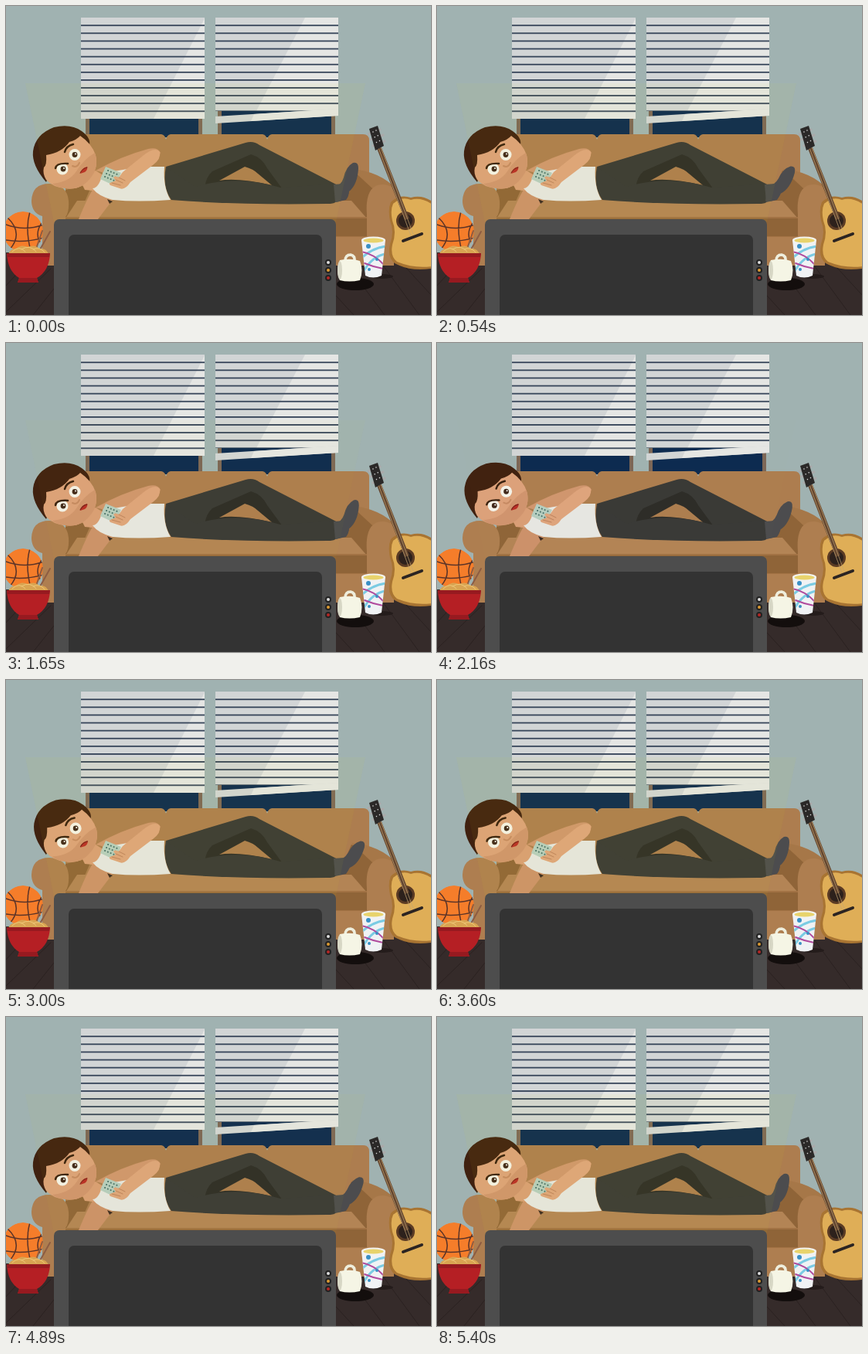
An HTML page for the animation above (5430 ms loop, 550x400 px).

```html
<!DOCTYPE html>
<html lang="en">
<head>
<meta charset="utf-8">
<title>Lazy evening on the sofa</title>
<style>
html, body { margin: 0; width: 100%; height: 100%; overflow: hidden; background: #a0b2b1 }
svg { display: block; width: 550px; height: 400px }
</style>
</head>
<body>
<svg viewBox="0 0 550 400" fill="none" stroke-linecap="round">
  <defs>
    <pattern id="gaps" width="200" height="10.1" y="24.3" patternUnits="userSpaceOnUse">
      <rect width="200" height="1.7" fill="#2b3a50"/>
    </pattern>
    <clipPath id="ball"><circle cx="22" cy="292" r="26"/></clipPath>
    <clipPath id="cup"><path d="M460 303L465 349Q475 354 486 349L491 303Z"/></clipPath>
  </defs>
  <rect width="550" height="400" fill="#a0b2b1"/>

  <!-- windows and blinds -->
  <g fill="#7c6656">
    <path d="M103 20H254V170H103ZM274 20H426V170H274Z"/>
    <path fill="#0c2a50" d="M108 20H249V170H108ZM279 20H421V170H279Z"/>
  </g>
  <path fill="#d2d5d6" d="M97 15H257V146H97ZM271 15H430V136H271Z"/>
  <path fill="#e5e6e4" d="M257 16V146H191ZM387 15H430V136H324Z"/>
  <path fill="url(#gaps)" d="M97 24H257V138H97ZM271 24H430V136H271Z"/>
  <path fill="#d2d5d6" d="M271 143L430 133V142L271 152Z"/>
  <path fill="#e5e6e4" d="M321 140L430 133V142L317 149Z"/>

  <!-- floor -->
  <path fill="#352b2a" d="M0 319H550V400H0Z"/>
  <path stroke="#2a2120" d="M0 362L24 336M0 396L58 340M35 400L62 366M427 375L450 400M445 340L490 400M488 336L535 400M505 325L550 374"/>

  <!-- sofa -->
  <path fill="#ad7d4f" d="M77 270V174Q77 166 85 166H201Q206 167 207 173Q208 167 213 166H332Q337 167 338 173Q339 167 344 166H462Q470 166 470 174V270Z"/>
  <path fill="#8f6438" d="M77 238L112 230L98 262L77 275ZM447 213L492 230L468 275L430 252Z"/>
  <path fill="#a67748" d="M447 211Q485 214 506 238L474 236Z"/>
  <path fill="#b38455" d="M77 275L92 252H447L467 275Z"/>
  <path fill="#a27244" d="M77 273H467V336H77Z"/>
  <path fill="#8f6438" d="M77 275H467V298H77Z"/>
  <path fill="#ae7e50" d="M77 273V299H467V336H47V272Q33 268 33 252Q34 230 56 230Q79 231 81 252Q82 267 77 273ZM467 336V270Q464 232 487 231Q511 233 511 256Q510 268 502 273V336Z"/>

  <!-- legs -->
  <path fill="#393936" d="M207 208L310 177Q320 174 328 180L437 236L425 254L355 235L309 208L270 240L214 250Z"/>
  <path fill="#2d2c28" d="M257 235Q259 221 267 214L317 192Q331 196 338 210L357 236Z"/>
  <path fill="#ad7d4f" d="M276 226L309 208Q320 211 326 217L344 232Q300 222 276 226Z"/>
  <path fill="#393937" d="M207 208Q202 235 214 251Q300 258 416 256Q427 256 428 252L425 230L355 235Q300 218 245 234Z"/>
  <path fill="#4c4c4e" d="M424 231L438 230Q448 241 440 251L426 254Z"/>
  <path id="foot" fill="#4c4c4e" d="M425 234Q434 232 437 222Q440 208 449 203Q456 201 456 210Q455 231 444 240Q443 251 427 254Z"/>

  <!-- torso and arms -->
  <path fill="#cc916a" d="M112 238Q105 249 94 276H119L138 251L126 236Z"/>
  <path fill="#d99e76" d="M94 222L116 213L130 222L122 240L102 238Z"/>
  <path fill="#e6e6e2" d="M112 236Q121 236 126 213L140 208L205 208Q203 235 213 251Q170 254 138 251Q119 246 112 236Z"/>
  <path fill="#3b2a22" d="M131 250L138 253L134 256Z"/>
  <path fill="#d0966e" d="M116 213Q150 194 184 185Q196 182 200 190Q197 200 180 207L128 216Z"/>
  <path fill="#b5cdc0" d="M129 208L149 216L141 233L122 224Z"/>
  <path stroke="#477069" stroke-width="2" stroke-dasharray=".1 4" d="M132 213L144 218M130 217L142 222M128 221L140 226"/>
  <path fill="#dea47c" d="M199 189Q201 198 190 206L161 228Q154 239 147 236L135 232Q132 229 137 228L142 226L139 222Q141 219 146 222L151 215L177 194Q193 181 199 189Z"/>
  <path stroke="#bd825d" d="M137 229L148 232M142 225L151 229M146 222L154 226"/>

  <!-- head -->
  <g id="head">
    <path fill="#402110" d="M52 228Q33 206 35 188Q38 166 62 157Q84 152 98 162Q113 173 106 184L62 205Z"/>
    <path fill="#dca17a" d="M52 225Q47 217 49 209Q53 206 52 193Q72 190 82 176Q92 173 96 168Q111 178 116 193Q120 209 109 223Q97 239 77 236Q61 235 52 225Z"/>
    <path fill="#d0946e" d="M115 190Q121 209 109 223Q97 239 77 236Q66 235 60 230Q82 228 91 214Q101 198 115 190Z"/>
    <path stroke="#c58962" stroke-width="2" d="M86 207Q92 210 95 203"/>
    <g id="eyes">
      <g fill="#f4f2e9"><circle cx="89" cy="192.500" r="7.500"/><circle cx="73" cy="211" r="7.500"/></g>
      <g fill="#40281b"><circle cx="89" cy="192.500" r="3.400"/><circle cx="74" cy="211" r="3.400"/></g>
      <g fill="#fff"><circle cx="90" cy="191.500" r="1"/><circle cx="75" cy="210" r="1"/></g>
    </g>
    <g id="lids" fill="#bb875f"><circle cx="89" cy="192.500" r="7.500"/><circle cx="73" cy="211" r="7.500"/></g>
    <path stroke="#38200f" stroke-width="2.500" d="M64 210Q65 203 80 204M76 189Q78 181 87 179"/>
    <path fill="#b92d27" d="M96 217Q97 210 105 208Q106 212 102 215Z"/>
    <path stroke="#702019" d="M96 216Q99 210 105 209"/>
  </g>

  <!-- glow from the television -->
  <path id="glow" fill="#d0ca18" d="M25 100H465L427 280H62Z"/>

  <!-- ball and bowl -->
  <g clip-path="url(#ball)">
    <circle cx="22" cy="292" r="26" fill="#f57d2a"/>
    <path stroke="#5c3428" stroke-width="1.500" d="M0 283Q24 292 49 283M31 266Q24 290 33 320M2 274Q23 294 5 315M48 278Q34 297 48 310M0 303Q24 307 49 300"/>
  </g>
  <path stroke="#8d5d43" stroke-width="2" d="M38 317L47 291M43 317L57 292"/>
  <path fill="#d9a452" d="M3 322Q5 314 13 314Q20 308 28 312Q37 308 43 314Q53 313 55 322Z"/>
  <path stroke="#efc878" d="M8 318Q17 309 25 318M20 315Q31 308 39 318M35 315Q44 311 50 319"/>
  <path fill="#b51f24" d="M1 320H57Q56 343 40 352L42 358H15L17 352Q2 343 1 320Z"/>
  <path fill="#971a20" d="M1 320H57L56 325H2ZM17 352H40L42 358H15Z"/>

  <!-- guitar -->
  <path fill="#a87432" d="M498 254Q509 243 524 248Q537 244 550 252V340Q523 344 503 333Q493 325 497 308Q503 292 497 278Q494 263 498 254Z"/>
  <path fill="#dfae57" d="M501 256Q511 246 524 251Q537 247 552 257V337Q526 340 506 331Q497 324 500 309Q506 292 500 278Q497 264 501 256Z"/>
  <circle cx="517" cy="278" r="12" fill="#5b3b24"/>
  <circle cx="517" cy="278" r="9" fill="#2d211c"/>
  <path stroke="#63452f" stroke-width="6" stroke-linecap="butt" d="M483 184L519 276"/>
  <path stroke="#c5a773" stroke-width=".7" d="M481 181L525 300M484 180L528 298"/>
  <path stroke="#2b2422" stroke-width="4" d="M514 304L538 295"/>
  <path stroke="#aaa" stroke-width="3" d="M469 166L484 160M472 173L488 167M475 181L490 175"/>
  <path fill="#2b2928" d="M470 159L481 155L489 181L478 187Z"/>
  <path stroke="#ddd" stroke-width="1.500" stroke-dasharray=".1 7" d="M475 163L481 181M479 161L485 179"/>

  <!-- mug and paper cup -->
  <ellipse cx="452" cy="360" rx="24" ry="8" fill="#130e0d"/>
  <ellipse cx="486" cy="350" rx="15" ry="3" fill="#241c1b"/>
  <path stroke="#eeeedd" stroke-width="3.500" d="M439 330Q439 322 446 322Q452 323 451 331"/>
  <path fill="#f5f5e5" d="M432 329Q447 326 458 330Q463 342 458 355Q444 358 432 355Q426 342 432 329Z"/>
  <ellipse cx="432" cy="342" rx="3" ry="12" fill="#d7d7c5"/>
  <g clip-path="url(#cup)">
    <path fill="#f0f2f4" d="M455 298H495V355H455Z"/>
    <path stroke="#7bcbe3" stroke-width="3" d="M459 327Q474 313 492 311M463 343Q474 324 491 321"/>
    <path stroke="#b04a9d" stroke-width="2" d="M460 318Q477 321 490 336M464 333Q476 338 488 340"/>
    <g fill="#398fc5"><circle cx="469" cy="311" r="3"/><circle cx="480" cy="328" r="2"/><circle cx="470" cy="341" r="2"/></g>
  </g>
  <ellipse cx="475.500" cy="303" rx="15.500" ry="4.500" fill="#f3f3ef"/>
  <ellipse cx="475.500" cy="303.500" rx="13" ry="3" fill="#e8d36c"/>

  <!-- television -->
  <rect x="62" y="276" width="365" height="140" rx="7" fill="#4d4d4d"/>
  <rect x="81" y="296" width="328" height="120" rx="7" fill="#333"/>
  <g stroke="#222" stroke-width="2">
    <circle cx="417" cy="332" r="3" fill="#ddd"/>
    <circle cx="417" cy="342" r="3" fill="#dc9b32"/>
    <circle cx="417" cy="352" r="3" fill="#b72725"/>
  </g>
</svg>
<script>
const LOOP = 5430, STEP = 30;
const el = id => document.getElementById(id);
const foot = el('foot'), head = el('head'), glow = el('glow'), eyes = el('eyes'), lids = el('lids');
const wave = (t, period) => Math.cos(2 * Math.PI * t / period);
const ease = (t, from, to) => {
  const p = Math.min(1, Math.max(0, (t - from) / (to - from)));
  return p * p * (3 - 2 * p);
};

function draw(now) {
  const t = Math.floor(now % LOOP / STEP) * STEP;
  const shut = t >= 4290 && t < 4470;
  const tilt = 2 * (ease(t, 1600, 2700) - ease(t, 3600, 4290));
  foot.setAttribute('transform', `rotate(${9.4 * (1 - wave(t, 1800))} 432 245)`);
  head.setAttribute('transform', `rotate(${tilt} 104 226)`);
  glow.setAttribute('opacity', 0.025 * (1 + wave(t, 600)));
  eyes.setAttribute('visibility', shut ? 'hidden' : 'visible');
  lids.setAttribute('visibility', shut ? 'visible' : 'hidden');
  requestAnimationFrame(() => draw(performance.now() - start));
}
const start = performance.now();
draw(0);
</script>
</body>
</html>
```
